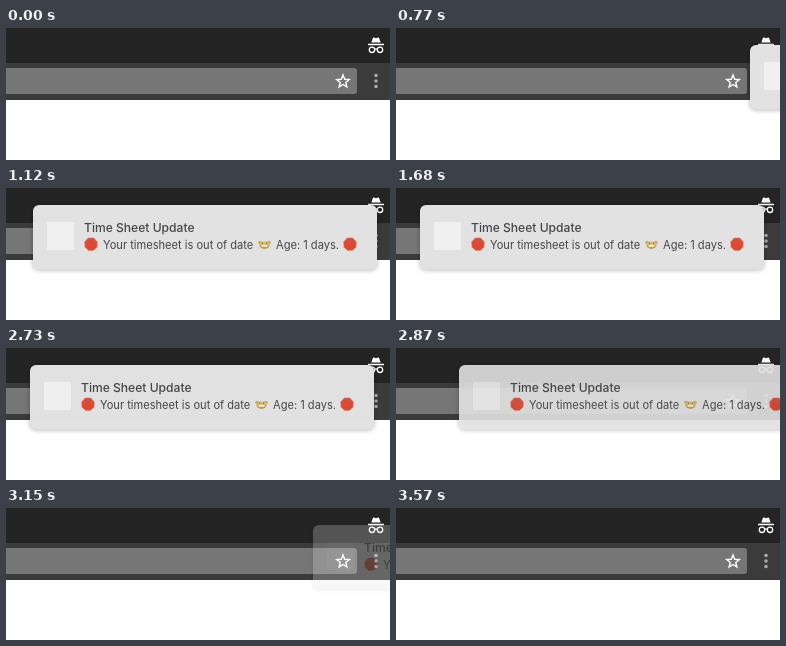
An HTML page with a canvas that plays this animation: 384x132 px, repeating every 3.64 s.

```html
<!DOCTYPE html>
<html lang="en">
<head>
<meta charset="utf-8">
<title>Time sheet notification</title>
<style>
  html, body { margin: 0; width: 100%; height: 100%; overflow: hidden; background: #fff; }
  canvas { display: block; }
</style>
</head>
<body>
<canvas id="stage" width="384" height="132"></canvas>
<script>
const W = 384, H = 132, LOOP = 3640, STEP = 70;
const REST = 24, TRAVEL = 360, EXIT = 380, PAD = 12;
const FONT = 'Inter, "Open Sans", sans-serif';
const ctx = document.getElementById('stage').getContext('2d');

function layer(w, h, draw) {
  const c = document.createElement('canvas');
  c.width = w;
  c.height = h;
  draw(c.getContext('2d'));
  return c;
}

function rect(g, x, y, w, h, r, fill) {
  g.beginPath();
  g.roundRect(x, y, w, h, r);
  g.fillStyle = fill;
  g.fill();
}

function oval(g, x, y, rx, ry, fill) {
  g.beginPath();
  g.ellipse(x, y, rx, ry, 0, 0, Math.PI * 2);
  g.fillStyle = fill;
  g.fill();
}

function radial(g, x, y, n, radius, turn) {
  g.beginPath();
  for (let i = 0; i < n; i++) {
    const a = turn + i * Math.PI * 2 / n, r = radius(i);
    g.lineTo(x + r * Math.cos(a), y + r * Math.sin(a));
  }
  g.closePath();
}

function shade(g, y0, y1, top, bottom) {
  const s = g.createLinearGradient(0, y0, 0, y1);
  s.addColorStop(0, top);
  s.addColorStop(1, bottom);
  return s;
}

function hatAndGlasses(g) {
  g.fillStyle = '#fff';
  g.beginPath();
  g.moveTo(365.4, 14.4);
  g.lineTo(366.8, 10.2);
  g.quadraticCurveTo(367.2, 9.4, 368, 9.6);
  g.lineTo(370, 10.3);
  g.lineTo(372, 9.6);
  g.quadraticCurveTo(372.8, 9.4, 373.2, 10.2);
  g.lineTo(374.6, 14.4);
  g.fill();
  rect(g, 362, 15.8, 16, 1.4, 0.5, '#fff');
  g.strokeStyle = '#fff';
  g.lineWidth = 1.3;
  for (const x of [366, 374]) {
    g.beginPath();
    g.arc(x, 21.8, 2.7, 0, Math.PI * 2);
    g.stroke();
  }
  g.beginPath();
  g.moveTo(368.6, 21.4);
  g.quadraticCurveTo(370, 20.4, 371.4, 21.4);
  g.stroke();
}

function browser(g) {
  g.fillStyle = '#fff';
  g.fillRect(0, 0, W, H);
  g.fillStyle = '#242424';
  g.fillRect(0, 0, W, 35);
  g.fillStyle = '#3b3b3b';
  g.fillRect(0, 35, W, 37);
  rect(g, -6, 40, 357, 26, 3, '#767676');

  radial(g, 337, 53.6, 10, i => i % 2 ? 2.9 : 6.6, -Math.PI / 2);
  g.strokeStyle = '#fff';
  g.lineWidth = 1.4;
  g.stroke();

  for (const y of [47.5, 53, 58.5]) oval(g, 370, y, 1.8, 1.8, '#aaa');
  hatAndGlasses(g);
}

function stopSign(g, x, y) {
  radial(g, x, y, 8, () => 7.3, Math.PI / 8);
  g.fillStyle = shade(g, y - 7, y + 7, '#c4604f', '#eed6d1');
  g.fill();
  radial(g, x, y, 8, () => 6.4, Math.PI / 8);
  g.fillStyle = shade(g, y - 6, y + 6, '#d4513d', '#e2452c');
  g.fill();
}

function grin(g, x, y) {
  for (const side of [-1, 1]) oval(g, x + side * 4.4, y - 2, 2, 1.8, '#c9ad62');
  oval(g, x, y + 0.6, 5.2, 3.9, shade(g, y - 4, y + 5, '#e4d08c', '#b98f3c'));
  for (const side of [-1, 1]) oval(g, x + side * 2, y - 1.4, 0.7, 0.7, '#5a4a2a');
  rect(g, x - 3, y + 0.2, 6, 2, 1, '#f4efe2');
}

// The card's left edge sits at PAD inside its layer.
function card(g) {
  g.translate(PAD, 0);
  g.shadowColor = 'rgba(0,0,0,.3)';
  g.shadowBlur = 5;
  g.shadowOffsetY = 0.5;
  rect(g, 0, 17, 344, 64.5, 6, '#e2e2e2');
  g.shadowColor = 'transparent';

  rect(g, 14, 34, 27, 28, 0, '#f0f0f0');

  g.fillStyle = '#464646';
  g.font = '500 12.1px ' + FONT;
  g.fillText('Time Sheet Update', 51, 44);
  g.font = '400 11.1px ' + FONT;
  g.fillText('Your timesheet is out of date', 70, 61);
  g.fillText('Age: 1 days.', 243, 61);
  stopSign(g, 58, 56.5);
  grin(g, 231.5, 56.5);
  stopSign(g, 317, 56.5);
}

const page = layer(W, H, browser);
const note = layer(W, H, card);

function pose(t) {
  if (t < 770 || t >= 3220) return null;
  if (t < 1258) {
    const left = 1 - (t - 758) / 500;
    return { x: REST + TRAVEL * left ** 3.5, alpha: 1 };
  }
  const out = Math.max(0, (t - 2705) / 515) ** 2;
  return { x: REST + EXIT * out, alpha: 1 - out };
}

function frame(now) {
  const t = Math.floor(now % LOOP / STEP) * STEP;
  const p = pose(t);
  ctx.globalAlpha = 1;
  ctx.drawImage(page, 0, 0);
  if (p) {
    ctx.globalAlpha = p.alpha;
    ctx.drawImage(note, Math.floor(p.x) - PAD, 0);
  }
}

const start = performance.now();
function tick() {
  frame(performance.now() - start);
  requestAnimationFrame(tick);
}
tick();
</script>
</body>
</html>
```
